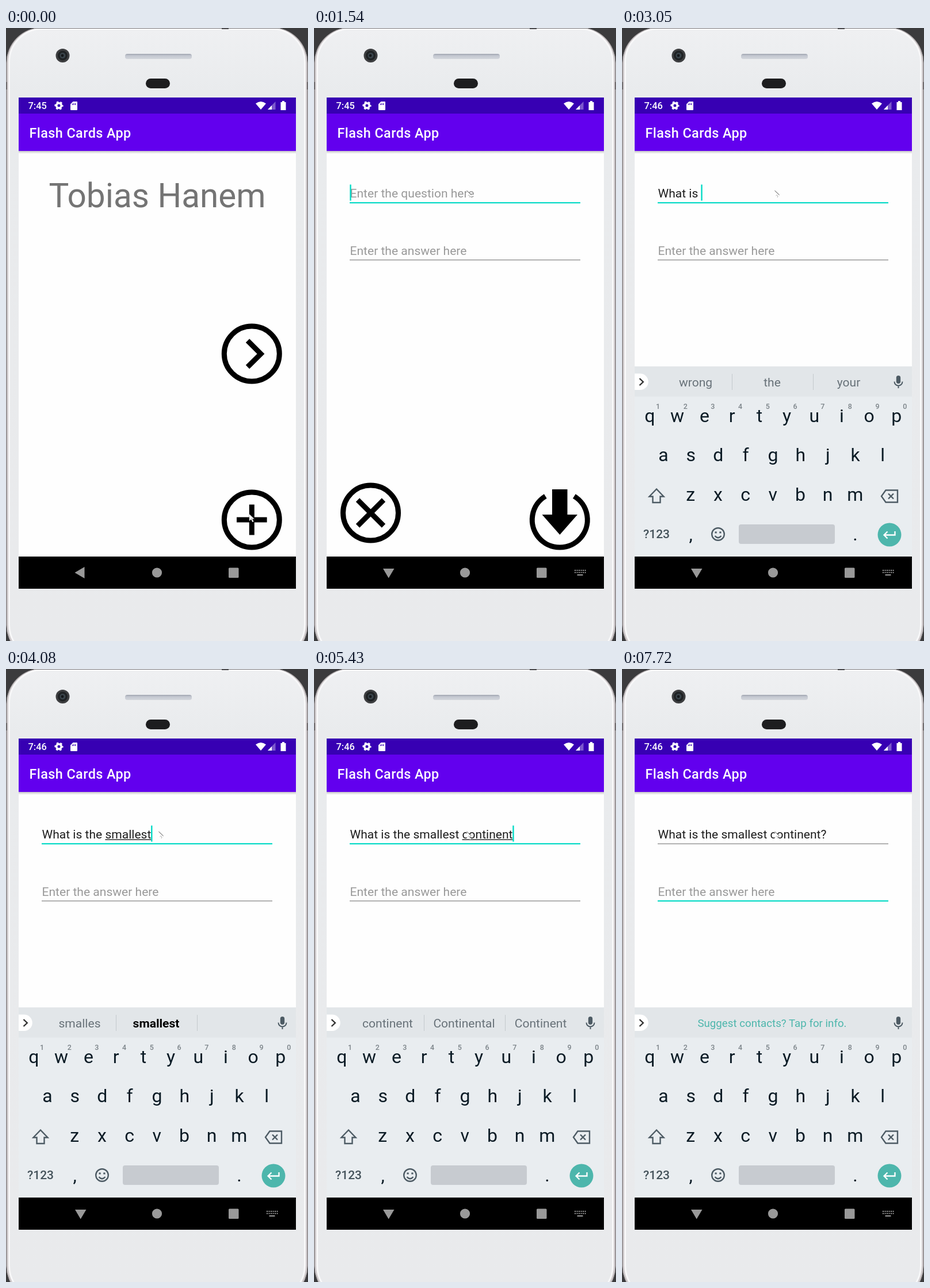
Recreate the animation shown at these times as an HTML page. Size 525 by 1067 pixels, loop 8000 ms.

```html
<!DOCTYPE html>
<html lang="en">
<head>
<meta charset="utf-8">
<title>Flash Cards App</title>
<style>
html, body { margin: 0; width: 100%; height: 100%; overflow: hidden; background: #3b3b3d; }
svg { display: block; width: 525px; height: 1067px; font-family: Roboto, sans-serif; }
text { white-space: pre; }
.mid { text-anchor: middle; }
.med { font-weight: 500; }
.title { font-size: 23.4px; font-weight: 500; letter-spacing: .42px; fill: #fff; }
.field { font-size: 21.06px; }
.hint { fill: #999; }
.key { font-size: 32px; fill: #0b1b25; }
.num { font-size: 12.5px; font-weight: 500; fill: #7b8388; }
.sug { font-size: 21.06px; fill: #687279; }
.bold { font-weight: 700; fill: #000; }
.ring { fill: none; stroke: #000; stroke-width: 9; }
.icon { fill: none; stroke: #4d5b64; stroke-width: 2.4; }
</style>
</head>
<body>
<svg viewBox="0 0 525 1067">
  <defs>
    <clipPath id="screen"><rect x="22" y="121" width="482" height="799"/></clipPath>
    <linearGradient id="body" x2="0" y2="1">
      <stop offset="0" stop-color="#eff0f2"/><stop offset=".1" stop-color="#e9ebed"/><stop offset="1" stop-color="#e9eaec"/>
    </linearGradient>
    <linearGradient id="slot" x2="0" y2="1">
      <stop offset="0" stop-color="#9da2ad"/><stop offset=".35" stop-color="#c3c7d0"/><stop offset="1" stop-color="#d3d6dc"/>
    </linearGradient>
    <linearGradient id="shade" x2="0" y2="1">
      <stop offset="0" stop-color="#c4c4c6"/><stop offset="1" stop-color="#fefefe"/>
    </linearGradient>
  </defs>

  <!-- phone -->
  <rect width="525" height="1067" fill="#3b3b3d"/>
  <rect x=".8" y="-1" width="523.4" height="1102" rx="62" fill="#cfcacc" stroke="#8d898b"/>
  <rect x="5.5" y="1.5" width="514" height="1095" rx="58" fill="url(#body)" stroke="#f8f8f9" stroke-width="3"/>
  <path d="M50 .5H475" stroke="#77767a"/>
  <rect x="375" width="12" height="2" fill="#4a4a4d"/>
  <path d="M.8 94V107M524.2 94V107" stroke="#5d5a5c" stroke-width="1.6"/>
  <circle cx="98.5" cy="48" r="12" fill="#3d3e40"/>
  <circle cx="98.5" cy="48" r="8.5" fill="#1f2224"/>
  <circle cx="98.5" cy="48" r="5" fill="#39434a"/>
  <circle cx="98" cy="48" r="2.4" fill="#131618"/>
  <rect x="207" y="45" width="116" height="9" rx="4" fill="url(#slot)"/>
  <rect x="243" y="88" width="42" height="17" rx="8.5" fill="#1d1d1f"/>

  <!-- bars -->
  <rect x="22" y="121" width="482" height="855" fill="#fefefe"/>
  <rect x="22" y="214" width="482" height="5" fill="url(#shade)"/>
  <rect x="22" y="121" width="482" height="28" fill="#3700b3"/>
  <rect x="22" y="149" width="482" height="65" fill="#6200ee"/>
  <text id="clock" class="med" x="38.5" y="141" font-size="16.4" fill="#fff"></text>
  <g fill="#fff">
    <circle cx="92" cy="135" r="4.3" fill="none" stroke="#fff" stroke-width="3.6"/>
    <circle cx="92" cy="135" r="6.4" fill="none" stroke="#fff" stroke-width="2.4" stroke-dasharray="3.4 3.302" stroke-dashoffset="1.7"/>
    <path d="M116.5 128H123Q124 128 124 129V142Q124 143 123 143H113Q112 143 112 142V132.5Z"/>
    <path d="M115.5 131.5V134M118 131V134M120.7 131V134" stroke="#3700b3" stroke-width="1.3"/>
    <path d="M434 131.5Q443 124.5 452 131.5L443 142Z"/>
    <path d="M468.5 128V142H455Z" opacity=".35"/>
    <path d="M462 134.8V142H455Z"/>
    <path d="M480 127H484V129H486.5V143H477.5V129H480Z"/>
  </g>

  <g clip-path="url(#screen)">
    <g id="card">
      <text class="title" x="40.5" y="191">Flash Cards App</text>
      <text class="mid" x="263" y="312" font-size="58.5" fill="#747474">Tobias Hanem</text>
      <g class="ring">
        <circle cx="427.3" cy="567" r="48"/>
        <path d="M420 544.3L443 567.2L420 590"/>
        <circle cx="427.3" cy="856" r="48"/>
        <path d="M401 856H453.6M427.3 829.5V882.5"/>
      </g>
    </g>
    <g id="form">
      <text class="title" x="40.5" y="191">Flash Cards App</text>
      <text id="ask" class="field hint" x="62.5" y="295">Enter the question here</text>
      <text id="typed" class="field" x="62.5" y="295" fill="#1d1d1d"></text>
      <rect id="mark" y="296.3" height="1.4" fill="#1d1d1d"/>
      <text class="field hint" x="62.5" y="394.5">Enter the answer here</text>
      <rect id="line1" x="62" width="401"/>
      <rect id="line2" x="62" width="401"/>
      <rect id="caret" width="2.4" height="28" fill="#03dac5"/>
      <g class="ring">
        <circle cx="98.5" cy="844" r="48"/>
        <path d="M76 821.5L121 866.5M121 821.5L76 866.5"/>
        <path d="M402.3 815A48 48 0 1 0 452.3 815"/>
      </g>
      <path d="M414 803H440.5V847H458L427.3 882L396.5 847H414Z"/>
    </g>
    <g id="board">
      <rect x="22" y="589" width="482" height="331" fill="#e9edf0"/>
      <rect x="22" y="589" width="482" height="52.5" fill="#e2e6e9"/>
      <path d="M22 601.5H31.5A14.2 14.2 0 0 1 31.5 630H22Z" fill="#fff"/>
      <path d="M30.5 610L36.8 616L30.5 622" class="icon" style="stroke:#333"/>
      <rect x="476.8" y="605" width="7.4" height="14" rx="3.7" fill="#4d5b64"/>
      <path d="M473.5 615.5A7 7 0 0 0 487.5 615.5M480.5 622.5V627" class="icon" style="stroke-width:2"/>
      <path id="split" d="M191.5 602V630M332.5 602V630" stroke="#c3c9cd"/>
      <text id="tip" class="mid" x="261" y="623" font-size="18.72" fill="#4db6ac">Suggest contacts? Tap for info.</text>
      <g id="words"></g>
      <g id="keys"></g>
      <text class="mid med" x="60" y="888" font-size="21" fill="#44525a">?123</text>
      <g class="icon">
        <path d="M60 802.5L47.5 815.5H53.5V826H66.5V815.5H72.5Z"/>
        <path d="M458.5 804.5H479V825.5H458.5L451 815ZM463 810.5L472 819.5M472 810.5L463 819.5"/>
        <circle cx="167" cy="881" r="10.8"/>
        <path d="M161.5 884Q167 890.5 172.5 884"/>
      </g>
      <path d="M161.5 878h3.2M169.3 878h3.2" stroke="#4d5b64" stroke-width="3.2"/>
      <rect x="203" y="864" width="167" height="34" rx="4" fill="#c7cbd0"/>
      <circle cx="465" cy="882" r="20.5" fill="#4db6ac"/>
      <path d="M474.5 876V882.5H456M461.5 876.5L455.5 882.5L461.5 888.5" fill="none" stroke="#fff" stroke-width="2.3"/>
    </g>
  </g>

  <!-- navigation -->
  <rect x="22" y="920" width="482" height="56" fill="#000"/>
  <g fill="#999">
    <path id="back" d="M119.5 948L136.5 938V958Z"/>
    <g id="down">
      <path d="M120 941H139.5L129.7 957.5Z"/>
      <path d="M453 944H472.5M453 947.8H472.5" stroke="#999" stroke-width="2" stroke-dasharray="2 1.5"/>
      <path d="M457.5 952H467.5" stroke="#999" stroke-width="2"/>
    </g>
    <circle cx="262.5" cy="948" r="8.6"/>
    <rect x="387" y="939.5" width="17.5" height="17.5" rx="1.5"/>
  </g>

  <g id="mouse">
    <path d="M0 0V12.5L3 9.8L5.5 14.5L7.6 13.4L5.3 9H9Z" fill="#fff"/>
    <path d="M0 .5L8 8.2" stroke="#444" fill="none"/>
    <path d="M2 9.5L4 8L5.5 10.5L4.5 12.5" stroke="#999" fill="none" stroke-width=".8"/>
  </g>
</svg>
<script>
const LOOP = 8000, WIDTH = 481.5;
const $ = id => document.getElementById(id);
const put = (id, attrs) => { for (const k in attrs) $(id).setAttribute(k, attrs[k]); };
const show = (id, on) => put(id, { visibility: on ? 'visible' : 'hidden' });

function addText(parent, cls, x, y, str) {
  const el = document.createElementNS('http://www.w3.org/2000/svg', 'text');
  el.setAttribute('class', 'mid ' + cls);
  el.setAttribute('x', x);
  el.setAttribute('y', y);
  el.textContent = str;
  $(parent).append(el);
}

function addRow(str, x, y) {
  [...str].forEach((c, i) => addText('keys', 'key', x + i * 47.65, y, c));
}
addRow('qwertyuiop', 48.3, 686);
addRow('asdfghjkl', 72, 754);
addRow('zxcvbnm', 119.3, 823);
[...'1234567890'].forEach((c, i) => addText('keys', 'num', 62.5 + i * 47.7, 663, c));
addText('keys', 'key', 119.7, 892, ',');
addText('keys', 'key', 405.5, 892, '.');

// Each step lists only what changes. "_" starts the word being composed, "*" marks a bold word.
const steps = [
  [0, { clock: '7:45', slide: 0, mouse: [423, 845.5], focus: 0, caret: false, nav: false, board: 0, text: '', words: null }],
  [400, { slide: .04, mouse: [420, 836] }],
  [520, { slide: .21, mouse: [370, 640] }],
  [640, { slide: .4465, mouse: [304, 419] }],
  [790, { slide: .73, mouse: [277, 330] }],
  [910, { slide: .9, mouse: [267, 290] }],
  [1030, { slide: .98, mouse: [265.5, 282.5] }],
  [1150, { slide: 1 }],
  [1300, { focus: 1, caret: true }],
  [1420, { nav: true }],
  [1660, { board: .75 }],
  [1780, { board: 1, caret: false }],
  [2050, { text: '_W', caret: true }],
  [2330, { text: '_Wha' }],
  [2480, { text: '_What', words: 'Wha *What the' }],
  [2600, { text: 'What ', words: 'are is the' }],
  [2750, { text: 'What _i', words: 'I *is in', clock: '7:46' }],
  [2900, { text: 'What _is', words: 'is *is it' }],
  [3050, { text: 'What is ', words: 'wrong the your' }],
  [3170, { text: 'What is _th', words: 'th *the this' }],
  [3320, { text: 'What is _the', words: 'the *the they' }],
  [3440, { text: 'What is the ', words: 'best most same' }],
  [3560, { text: 'What is the _sm', words: 'sm *small smart' }],
  [3680, { text: 'What is the _small', words: 'small *small smaller' }],
  [3800, { text: 'What is the _smalle', words: 'smalle *smallest smaller' }],
  [4080, { text: 'What is the _smallest', words: 'smalles *smallest' }],
  [4200, { text: 'What is the smallest ', words: null }],
  [4350, { text: 'What is the smallest _c', words: 'can *c ch' }],
  [4500, { text: 'What is the smallest _co', words: 'co *come could' }],
  [4620, { text: 'What is the smallest _con', words: 'con *control continue' }],
  [4740, { text: 'What is the smallest _cont', words: 'cont *content continue' }],
  [4890, { text: 'What is the smallest _contin', words: 'contin *continent continue' }],
  [5040, { text: 'What is the smallest _contine', words: 'contine *continent continue' }],
  [5310, { text: 'What is the smallest _continen', words: 'continen *continent continental' }],
  [5430, { text: 'What is the smallest _continent', words: 'continent Continental Continent' }],
  [6020, { text: 'What is the smallest continent ', words: '' }],
  [6670, { text: 'What is the smallest _continent', words: 'continent Continental Continent' }],
  [6920, { text: 'What is the smallest continent?', words: '' }],
  [7320, { focus: 2, words: null }],
  [7720, { caret: false }]
];

function drawLine(id, y, on) {
  put(id, { y: on ? y - .6 : y, height: on ? 2.2 : 1.1, fill: on ? '#03dac5' : '#757575' });
}

function draw(s) {
  $('clock').textContent = s.clock;
  const dx = s.slide * WIDTH;
  put('card', { transform: `translate(${-dx} 0)` });
  put('form', { transform: `translate(${WIDTH - dx} 0)` });
  put('mouse', { transform: `translate(${s.mouse})` });

  const typed = $('typed'), start = s.text.indexOf('_');
  typed.textContent = s.text.replace('_', '');
  const widthTo = n => n > 0 ? typed.getSubStringLength(0, n) : 0;
  const full = widthTo(typed.textContent.length);
  show('ask', !s.text);
  show('mark', start >= 0);
  if (start >= 0) put('mark', { x: 62.5 + widthTo(start), width: full - widthTo(start) });

  drawLine('line1', 303.7, s.focus === 1);
  drawLine('line2', 403.2, s.focus === 2);
  show('caret', s.caret);
  put('caret', s.focus === 2 ? { x: 62.3, y: 372 } : { x: 62.3 + full, y: 272.5 });

  show('back', !s.nav);
  show('down', s.nav);
  put('board', { opacity: s.board, transform: `translate(0 ${(1 - s.board) * 64})` });
  const plain = s.words === null;
  show('tip', plain && !(s.focus === 1 && s.text.includes('smallest')));
  show('split', !plain);
  $('words').textContent = '';
  (s.words || '').split(' ').forEach((w, i) => {
    addText('words', w[0] === '*' ? 'sug bold' : 'sug', 128 + i * 133, 623.5, w.replace('*', ''));
  });
}

let last = -1;
function tick(now) {
  const t = now % LOOP;
  const past = steps.filter(([at]) => at <= t);
  if (past.length !== last) {
    last = past.length;
    draw(Object.assign({}, ...past.map(([, change]) => change)));
  }
  requestAnimationFrame(tick);
}
tick(0);
</script>
</body>
</html>
```
